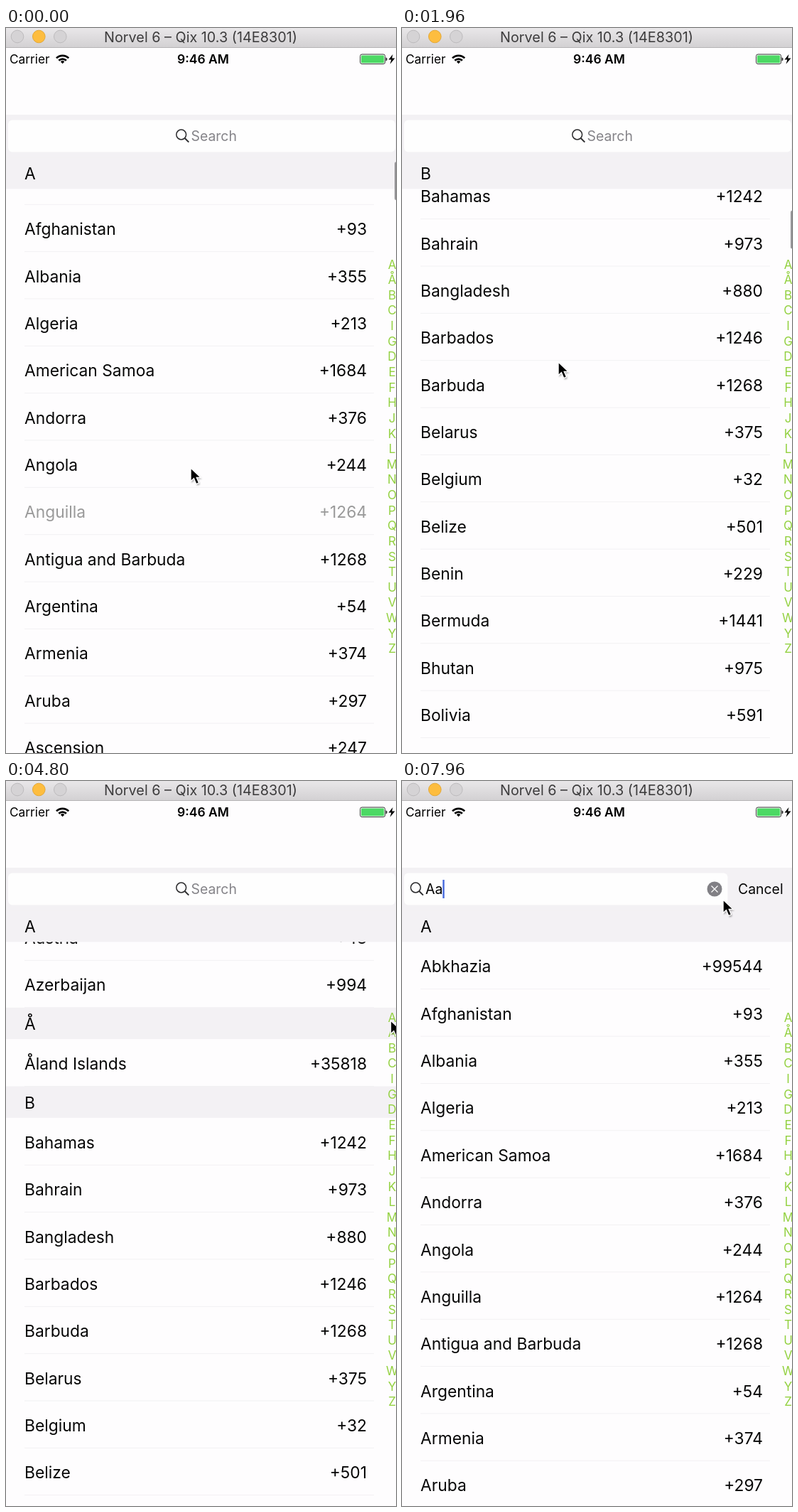
Animation, 549 px wide and 1020 px high, one loop 8 s. Source, as an HTML page:

```html
<!DOCTYPE html>
<html lang="en">
<head>
<meta charset="utf-8">
<title>Country picker</title>
<style>
html, body { margin: 0; width: 100%; height: 100%; overflow: hidden; background: #fefdfe; }
svg { display: block; width: 549px; height: 1020px; font-family: Inter, "Liberation Sans", sans-serif; }
.row { font-size: 22.8px; fill: #060606; }
.index { font-size: 17px; fill: #93d140; text-anchor: middle; }
.field { font-size: 19.4px; }
</style>
</head>
<body>
<svg id="stage" viewBox="0 0 549 1020" width="549" height="1020">
  <defs>
    <linearGradient id="bar" x1="0" y1="0" x2="0" y2="1">
      <stop offset="0" stop-color="#e9e7e9"/><stop offset="1" stop-color="#d2d0d2"/>
    </linearGradient>
    <clipPath id="view"><rect y="182" width="549" height="838"/></clipPath>
    <filter id="soft" x="-50%" y="-50%" width="200%" height="200%"><feGaussianBlur stdDeviation="1.3"/></filter>
  </defs>
  <rect width="549" height="1020" fill="#fefdfe"/>
  <g clip-path="url(#view)"><g id="list"></g><g id="heads"></g></g>
  <rect id="thumb" x="547" width="5" height="54" rx="2.5" fill="#98979a"/>
  <g id="index" class="index"></g>

  <rect y="122" width="549" height="60.5" fill="#f3f1f4"/>
  <rect id="box" x="3" y="129.5" height="45" rx="6" fill="#fefefe"/>
  <g id="glass" fill="none" stroke="#2b2b2d" stroke-width="1.5">
    <circle cx="246.7" cy="150" r="6.9"/><path d="M251.7 155L257.3 160.6" stroke-width="1.9"/>
  </g>
  <text id="hint" class="field" y="159.3" fill="#858489">Search</text>
  <text id="typed" class="field" x="33" y="159.3"></text>
  <rect id="caret" y="139" width="2.4" height="26" fill="#4468dd"/>
  <g id="clear">
    <circle cx="440" cy="152" r="10.5" fill="#818085"/>
    <path d="M435.5 147.5l9 9m0-9l-9 9" stroke="#fff" stroke-width="1.3"/>
  </g>
  <text id="cancel" class="field" y="159.3" fill="#060606">Cancel</text>

  <rect width="549" height="28" fill="url(#bar)"/>
  <rect y="27" width="549" height="1" fill="#b5b3b5"/>
  <g stroke="#bdbbbd">
    <circle cx="16" cy="12" r="8.8" fill="#d5d3d5"/>
    <circle cx="46.3" cy="12" r="8.8" fill="#fdbd3f" stroke="#e3a838"/>
    <circle cx="76.3" cy="12" r="8.8" fill="#d5d3d5"/>
  </g>
  <text x="274" y="19.7" font-size="19.8" text-anchor="middle" fill="#3d3c3d">Norvel 6 – Qix 10.3 (14E8301)</text>
  <text x="5" y="50" font-size="17.3">Carrier</text>
  <g fill="none" stroke="#000" stroke-width="2.6">
    <path d="M71 42.4a12.2 12.2 0 0 1 17.2 0M74.3 45.8a7.6 7.6 0 0 1 10.6 0"/>
    <path d="M79.6 50.2l-2.7-2.8a3.9 3.9 0 0 1 5.4 0z" fill="#000" stroke="none"/>
  </g>
  <text x="277.5" y="50" font-size="17.5" font-weight="600" text-anchor="middle">9:46 AM</text>
  <rect x="498.6" y="37" width="35" height="13.6" rx="2.5" fill="#fff" stroke="#333" stroke-width="1"/>
  <rect x="500" y="38.4" width="32.2" height="10.8" rx="1.3" fill="#4cd964"/>
  <path d="M534.6 41.5q2 0 2 2.4t-2 2.4z" fill="#222"/>
  <path d="M544.5 37l-6 7.6h3.9l-1.8 6.2 6.9-8.2h-4.2z"/>

  <g id="pointer">
    <path d="M1 2v19l4.7-4.2 3.3 8 4-1.7-3.3-7.6h6z" fill="#000" opacity=".35" filter="url(#soft)"/>
    <path d="M0 0v18.8l4.4-4 3.3 7.8 3.9-1.7-3.3-7.4h6z" fill="#000" stroke="#fff" stroke-width="1.4"/>
  </g>
</svg>
<script>
const $ = id => document.getElementById(id);
const LOOP = 8000, TOP = 182, HEAD = 44.4, ROW = 66.35;

const sections = {
  "A": "Abkhazia 99544,Afghanistan 93,Albania 355,Algeria 213,American Samoa 1684,Andorra 376,Angola 244,Anguilla 1264,Antigua and Barbuda 1268,Argentina 54,Armenia 374,Aruba 297,Ascension 247,Australia 61,Australian External Territories 672,Austria 43,Azerbaijan 994",
  "Å": "Åland Islands 35818",
  "B": "Bahamas 1242,Bahrain 973,Bangladesh 880,Barbados 1246,Barbuda 1268,Belarus 375,Belgium 32,Belize 501,Benin 229,Bermuda 1441,Bhutan 975,Bolivia 591,Bonaire 5997,Bosnia and Herzegovina 387,Botswana 267,Brazil 55,British Virgin Islands 1284,Brunei 673,Bulgaria 359,Burkina Faso 226,Burundi 257"
};

function add(parent, tag, attrs, text) {
  const el = document.createElementNS("http://www.w3.org/2000/svg", tag);
  for (const k in attrs) el.setAttribute(k, attrs[k]);
  if (text) el.textContent = text;
  parent.appendChild(el);
  return el;
}

// Static content: rows, section headers, letter index
const heads = [];
let pressedRow, y = TOP;
for (const letter in sections) {
  const g = add($("heads"), "g", { class: "row" });
  add(g, "rect", { width: 549, height: HEAD, fill: "#f3f1f4" });
  add(g, "text", { x: 26, y: 31.2 }, letter);
  heads.push({ g, y });
  y += HEAD;
  for (const entry of sections[letter].split(",")) {
    const cut = entry.lastIndexOf(" "), name = entry.slice(0, cut);
    const row = add($("list"), "g", { class: "row", transform: `translate(0 ${y})` });
    add(row, "text", { x: 26, y: 43 }, name);
    add(row, "text", { x: 508, y: 43, "text-anchor": "end" }, "+" + entry.slice(cut + 1));
    add(row, "rect", { x: 26, y: ROW - 0.5, width: 492, height: 1, fill: "#f2f1f3" });
    if (name === "Anguilla") pressedRow = row;
    y += ROW;
  }
}
[..."AÅBCIGDEFHJKLMNOPQRSTUVWYZ"].forEach((c, i) =>
  add($("index"), "text", { x: 543.5, y: 338.6 + i * 21.63 }, c));

const clamp = v => Math.max(0, Math.min(1, v));
const part = (t, a, b) => clamp((t - a) / (b - a));
const smooth = u => u * u * (3 - 2 * u);
const decay = (t, start, tau) => 1 - Math.exp(-(t - start) / tau);

// Pointer moves: start, end, target x, target y, easing
const moves = [
  [0, 603.5, 230, 210, u => u ** 2.3],
  [680, 1240, 220, 686, smooth],
  [1340, 1800, 220, 470, u => u * (1.55 - 0.55 * u)],
  [3000, 3600, 222, 690, u => u ** 2.2],
  [4240, 4740, 541.5, 337, smooth],
  [5320, 5840, 327, 153, smooth],
  [6300, 6640, 388, 201, smooth],
  [7520, 7900, 452, 167, smooth]
];
function pointer(t) {
  let x = 260, y = 619;
  for (const [a, b, tx, ty, ease] of moves) {
    if (t < a) break;
    const u = ease(part(t, a, b));
    x += (tx - x) * u;
    y += (ty - y) * u;
  }
  return { x, y };
}

// Drags follow the pointer, then the list glides to rest
function scrollAt(t, py) {
  if (t < 603.5) return 44.5 + 619 - py;
  if (t < 1340) return 453.5 + 780.9 * decay(t, 603.5, 500);
  if (t < 1800) return 1055.4 + 686 - py;
  if (t < 3000) return 1271.4 + 130 * decay(t, 1800, 500);
  if (t < 3600) return 1389.6 + 470 - py;
  if (t < 4880) return 1169.6 - 134 * decay(Math.min(t, 4180), 3600, 150) / decay(4180, 3600, 150);
  return 0;
}

function move(el, x, y) { el.setAttribute("transform", `translate(${x.toFixed(2)} ${y.toFixed(2)})`); }
function show(el, v) { el.setAttribute("opacity", +v); }

function draw(t) {
  const p = pointer(t), s = scrollAt(t, p.y);
  move($("pointer"), p.x, p.y);
  move($("list"), 0, -s);
  heads.forEach((h, i) => {
    const next = heads[i + 1];
    const limit = next ? next.y - s - HEAD : Infinity;
    move(h.g, 0, Math.min(Math.max(TOP, h.y - s), limit));
  });
  const grey = Math.round(6 + 148 * (1 - part(t, 40, 240)));
  pressedRow.style.fill = `rgb(${grey},${grey},${grey})`;
  $("thumb").setAttribute("y", 185.8 + 0.0542 * s);
  show($("thumb"), 1 - part(t, 4200, 4480));

  const open = smooth(part(t, 6000, 6320)), shift = -227.5 * open;
  $("box").setAttribute("width", 545 - 89.5 * open);
  move($("glass"), shift, 0);
  $("hint").setAttribute("x", 260.5 + shift);
  $("cancel").setAttribute("x", 563 - 90 * open);

  const text = t < 7040 ? "" : t < 7640 ? "A" : "Aa";
  $("typed").textContent = text;
  show($("hint"), !text);
  show($("clear"), !!text);
  $("caret").setAttribute("x", text ? 33 + $("typed").getComputedTextLength() : 33);
  show($("caret"), text ? 1 : part(t, 6240, 6320) * (1 - part(t, 6780, 6900)));
}

function tick() {
  draw(performance.now() % LOOP);
  requestAnimationFrame(tick);
}
tick();
</script>
</body>
</html>
```
